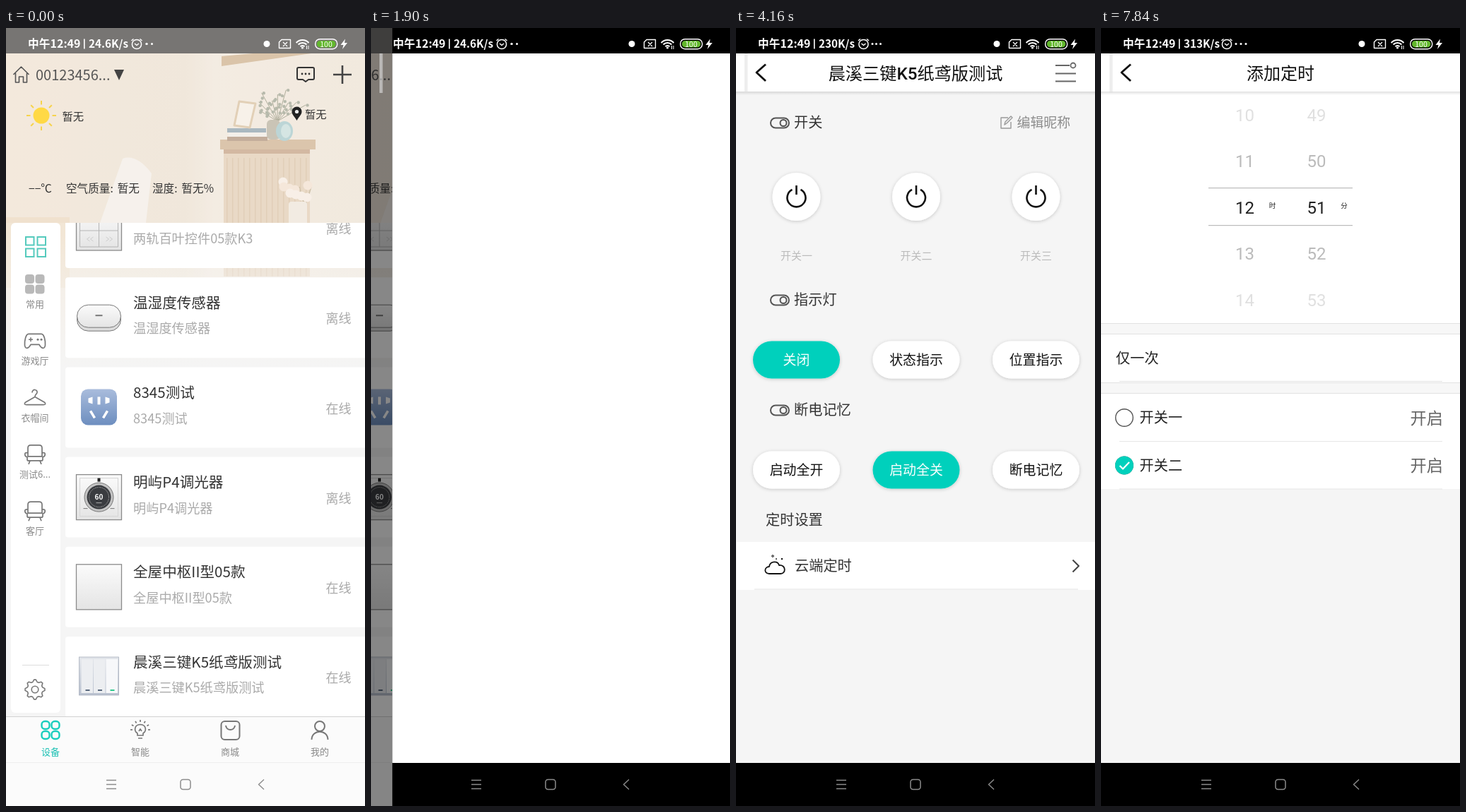
Recreate the animation shown at these times as an HTML page. Size 508 by 1102 pixels, loop 8000 ms.

```html
<!DOCTYPE html>
<html lang="zh">
<head>
<meta charset="utf-8">
<style>
html, body { margin: 0; width: 100%; height: 100%; overflow: hidden; background: #000; }
svg { display: block; width: 100vw; height: 100vh; font-family: "Noto Sans CJK SC", "Noto Sans CJK", sans-serif; }
</style>
</head>
<body>
<svg id="stage" viewBox="0 0 508 1102"></svg>
<script>
const stage = document.getElementById('stage');
const TEAL = '#00d0bc';

// Drawing helpers; text is placed by its vertical centre.
const text = (x, y, size, fill, str, more = '') =>
  `<text x="${x}" y="${y + size * 0.37}" font-size="${size}" fill="${fill}" ${more}>${str}</text>`;
const mid = (x, y, size, fill, str, more = '') => text(x, y, size, fill, str, 'text-anchor="middle" ' + more);
const rect = (x, y, w, h, fill, more = '') =>
  `<rect x="${x}" y="${y}" width="${w}" height="${h}" fill="${fill}" ${more}/>`;
const disc = (x, y, r, fill, more = '') => `<circle cx="${x}" cy="${y}" r="${r}" fill="${fill}" ${more}/>`;
const line = (d, color, w = 2, fill = 'none') =>
  `<path d="${d}" fill="${fill}" stroke="${color}" stroke-width="${w}" stroke-linejoin="round"/>`;
const at = (x, y, body) => `<g transform="translate(${x} ${y})">${body}</g>`;
const group = (id, body) => `<g id="${id}">${body}</g>`;
const grad = (id, stops, dir = 'x1="0" y1="0" x2="0" y2="1"') =>
  `<linearGradient id="${id}" ${dir}>${stops.map(([o, c, a = 1]) =>
    `<stop offset="${o}" stop-color="${c}" stop-opacity="${a}"/>`).join('')}</linearGradient>`;
const repeat = (n, f) => Array.from({ length: n }, (_, i) => f(i)).join('');
const polar = (r, a) => `${(r * Math.cos(a)).toFixed(1)} ${(r * Math.sin(a)).toFixed(1)}`;
const rays = (n, r1, r2, color, w, from = 0, span = 2 * Math.PI) => repeat(n, i => {
  const a = from + i * span / n;
  return line(`M${polar(r1, a)}L${polar(r2, a)}`, color, w);
});
const four = (x, y, size, step, fill, more) =>
  repeat(4, i => rect(x + (i % 2) * step, y + (i >> 1) * step, size, size, fill, more));

const defs = `<defs>
  ${grad('wall', [[0, '#eedfcd'], [0.5, '#e9dccb'], [0.58, '#eee3d5'], [1, '#ebdfcf']], '')}
  ${grad('fade', [[0, '#f5f5f5', 0], [1, '#f5f5f5']])}
  ${grad('blue', [[0, '#a9bcdc'], [1, '#6d8ebf']])}
  ${grad('plate', [[0, '#fbfbfb'], [1, '#e4e4e4']])}
  ${grad('frame', [[0, '#e3e6ea'], [1, '#b9c1cf']])}
  ${grad('drop', [[0, '#000', 0.12], [1, '#000', 0]])}
  <clipPath id="list"><rect x="80" y="276" width="428" height="699"/></clipPath>
  <filter id="soft" x="-30%" y="-30%" width="160%" height="170%">
    <feDropShadow dx="0" dy="1" stdDeviation="2.5" flood-opacity=".2"/></filter>
</defs>`;

// ---- Home page ----
const photo = rect(0, 36, 508, 450, 'url(#wall)')
  + line('M305 40L350 36H432L305 54Z', 'none', 0, '#c9aa84')
  + line('M133 276L165 185Q185 178 206 206L198 276Z', 'none', 0, '#f1ebe3')
  + rect(0, 268, 90, 100, '#e9d3b8')
  + rect(308, 172, 122, 180, '#dfc8ad')
  + repeat(15, i => rect(312 + i * 8, 184, 1.5, 168, '#d4b999'))
  + rect(303, 158, 135, 14, '#cbab88') + rect(308, 172, 122, 6, '#c0997a')
  + rect(313, 154, 57, 6, '#a98a70') + rect(315, 148, 54, 6, '#eee8df') + rect(313, 142, 55, 6, '#8599a5')
  + line('M330 104L353 107L345 141L323 138Z', '#d5bb98', 3, '#f3ebdf')
  + at(384, 132, repeat(9, i => {
      const a = -2.6 + i * 0.26, r = 30 + (i % 3) * 8;
      return line(`M0 0L${polar(r, a)}`, '#8c8a70', 1)
        + repeat(4, k => `<g transform="translate(${polar(r * (0.45 + k * 0.18), a)})">${disc(k % 2 ? 3 : -3, 0, 2.2, '#989c88')}</g>`);
    }))
  + rect(369, 130, 19, 28, '#b3aa96', 'rx="6"')
  + '<ellipse cx="394" cy="146" rx="12" ry="14" fill="#9fc3c4"/><ellipse cx="396" cy="146" rx="7" ry="10" fill="#c3d9d7"/>'
  + line('M422 250L415 225M424 250L432 225', '#b8a583', 1.5)
  + repeat(9, i => disc(392 + (i * 17) % 42, 218 + (i * 11) % 24, 6.5, i % 2 ? '#f0dcca' : '#f4e8dc'))
  + rect(400, 246, 26, 36, '#ece2d5', 'rx="4"')
  + rect(0, 36, 508, 450, '#fff', 'opacity=".3"')
  + rect(0, 276, 508, 210, '#fff', 'opacity=".15"')
  + rect(0, 290, 508, 196, 'url(#fade)');

const pad = 'M-9 -10C-13 -10 -15 0 -14.5 6C-14 12 -9 11 -6 5H6C9 11 14 12 14.5 6C15 0 13 -10 9 -10Z';
const rooms = [
  ['常用', four(-14, -14, 13, 14.5, '#b9b9b9', 'rx="4"')],
  ['游戏厅', line(pad, '#777', 1.7) + line('M-9 -2H-3M-6 -5V1', '#777', 1.5)
    + disc(4, -2, 1.5, '#777') + disc(9, -2, 1.5, '#777')],
  ['衣帽间', line('M-4 -7C-4 -13 4 -12 3 -7C2 -4 0 -5 0 -1L14 7Q16 10 12 10H-12Q-16 10 -14 7L0 -1', '#777', 1.7)],
  ['测试6...', 'chair'], ['客厅', 'chair']
];
const chair = line('M-10 -2V-9Q-10 -13 -6 -13H6Q10 -13 10 -9V-2M-10 -2C-16 -4 -15 3 -11 4V7Q-11 9 -9 9H9Q11 9 11 7V4C15 3 16 -4 10 -2V3H-10ZM-7 9L-9 14M7 9L9 14', '#777', 1.7);
const gear = line('M' + Array.from({ length: 32 }, (_, i) =>
  polar(i % 4 < 2 ? 14 : 11, (i - 0.5) * Math.PI / 16)).join('L') + 'Z', '#777', 1.6) + disc(0, 0, 4.8, 'none', 'stroke="#777" stroke-width="1.6"');

const sidebar = rect(7, 276, 70, 694, '#fff', 'rx="6"')
  + four(28, 296, 11.5, 16.5, 'none', 'stroke="#55cabd" stroke-width="2"')
  + rooms.map(([name, icon], i) =>
      at(41, 363 + i * 80.3, icon === 'chair' ? chair : icon) + mid(41, 391 + i * 80.4, 13, '#8a8a8a', name)).join('')
  + rect(23, 902, 38, 1, '#ddd') + at(41, 937, gear);

// Device pictures are drawn around their centre.
const plate = rect(-32, -32, 64, 64, 'url(#plate)', 'stroke="#8b8b8b" stroke-width="1.3"');
const devices = [
  ['两轨百叶控件05款K3', '离线', plate + line('M0 -27V27M-27 4H27M-27 -27H27V27H-27Z', '#b5b5b5', 1)
    + line('M-13 13L-17 16L-13 19M-8 13L-12 16L-8 19M10 13L14 16L10 19M15 13L19 16L15 19', '#ccc', 1)],
  ['温湿度传感器', '离线', rect(-31, -14, 62, 33, '#dcdcdc', 'rx="16" stroke="#777" stroke-width="1"')
    + rect(-31, -18, 62, 32, 'url(#plate)', 'rx="16" stroke="#777" stroke-width="1"')
    + line('M-5 -3H5', '#777', 2)],
  ['8345测试', '在线', rect(-25.5, -26, 51, 51, 'url(#blue)', 'rx="10"')
    + rect(-2, -15, 4, 11, '#fff') + line('M-15 -13L-9 -15V-5L-15 -7ZM15 -13L9 -15V-5L15 -7Z', 'none', 0, '#fff')
    + line('M-12 5L-6 15M12 5L6 15', '#fff', 3.5)],
  ['明屿P4调光器', '离线', plate + rect(-27, -27, 54, 54, 'none', 'stroke="#d5d5d5"') + rect(-2, -27, 4, 5, '#222')
    + disc(0, 0, 20.5, '#c4c4c4', 'stroke="#777" stroke-width="1"') + disc(0, 0, 17, '#3a3c40')
    + disc(0, 0, 14, 'none', 'stroke="#aaa" stroke-dasharray="1.5 1"')
    + mid(0, 0, 10, '#fff', '60', 'font-weight="700"') + line('M-4 8H4', '#aaa', 1)
    + line('M-22 16H-16M16 16H22', '#777', 1)],
  ['全屋中枢II型05款', '在线', plate],
  ['晨溪三键K5纸鸢版测试', '在线', rect(-28, -28, 56, 54, 'url(#frame)', 'stroke="#a9b0bd" stroke-width=".8"')
    + repeat(3, i => rect(-25 + i * 17.5, -25, 16.5, 48, i < 2 ? '#eceef1' : '#f7f8fa')
      + rect(-19 + i * 17.5, 18, 6, 2, i < 2 ? '#57677c' : '#2fc98e'))]
];
const cards = devices.map(([name, state, icon], i) => at(84, 226 + i * 127.2,
  rect(0, 0, 430, 114, '#fff', 'rx="4"') + at(47.5, 57, icon)
  + text(96, 36, 20.6, '#333', name) + text(96, 72.5, 18.2, '#aaa', name)
  + text(368.5, 58.5, 18, '#aaa', state))).join('');

const tabs = rect(0, 975, 508, 127, '#fbfbfb') + rect(0, 975, 508, 1, '#d2d2d2') + rect(0, 1040, 508, 1, '#eee')
  + four(50.5, 982, 11, 14, 'none', 'rx="4.5" stroke="#18cdbd" stroke-width="2.4"')
  + at(190, 994, line('M-4 8V5C-9 2 -9 -7 0 -7.5C9 -7 9 2 4 5V8ZM-3 12H3M-2 2L0 -1L2 2', '#777', 1.7)
    + rays(7, 11, 14, '#777', 1.7, -Math.PI, Math.PI * 7 / 6))
  + rect(304.5, 982, 26, 26, 'none', 'rx="5" stroke="#777" stroke-width="2"') + line('M311 988C312 996 323 996 324 988', '#777')
  + disc(444, 989, 7, 'none', 'stroke="#777" stroke-width="2"') + line('M432.5 1008C433 993 455 993 455.5 1008', '#777')
  + ['设备', '智能', '商城', '我的'].map((s, i) =>
      mid(63 + i * 127, 1025.5, 13, i ? '#888' : '#18bfb2', s)).join('');

const home = rect(0, 0, 508, 1102, '#f5f5f5') + photo
  + rect(0, 0, 508, 36, '#777573')
  + line('M10.5 66L21.5 55L32.5 66M13.5 64V77H18.5V69H24.5V77H29.5V64', '#555', 1.6)
  + text(42, 67, 20, '#555', '00123456...')
  + line('M153 59H167L160 74Z', 'none', 0, '#444')
  + line('M414 56H434Q436 56 436 58V71Q436 73 434 73H428L424 76L420 73H414Q412 73 412 71V58Q412 56 414 56Z', '#333')
  + repeat(3, i => disc(419 + i * 5, 65, 1.4, '#333'))
  + line('M463 66H489M476 53V79', '#444', 2.6)
  + at(50, 124, disc(0, 0, 11.5, '#ffd945') + rays(8, 15.5, 21, '#f6d34c', 2))
  + text(79.5, 125, 15.3, '#333', '暂无')
  + line('M411.5 131C407 124 404.5 122 404.5 118.5A7 7 0 0 1 418.5 118.5C418.5 122 416 124 411.5 131Z', 'none', 0, '#222')
  + disc(411.5, 118.5, 2.6, '#eee') + text(423, 122.5, 15.3, '#333', '暂无')
  + text(32, 227, 15.6, '#333', '−−℃') + text(85, 227, 15.6, '#333', '空气质量: 暂无', 'word-spacing="2.5"')
  + text(207, 227, 15.6, '#333', '湿度: 暂无%', 'word-spacing="2.5"')
  + sidebar + `<g clip-path="url(#list)">${cards}</g>` + tabs
  + rect(-10, 0, 800, 1102, '#000', 'id="dim"');

// ---- Pages behind the home page ----
const shade = rect(0, 90, 508, 5, 'url(#drop)');
const back = line('M42 51.5L29 63L42 75', '#111', 2.8);
const title = s => mid(254, 64, 24, '#111', s);
const sheet = rect(0, 36, 508, 1005, '#f5f5f5') + rect(0, 36, 508, 54, '#fff') + shade;

const heading = (y, s) => rect(49, y - 6.5, 26, 14, 'none', 'rx="7" stroke="#555" stroke-width="2"')
  + disc(67, y + 0.5, 4.5, 'none', 'stroke="#555" stroke-width="2"') + text(82, y, 20.2, '#333', s);
const columns = [85.5, 255, 424.5];
const pills = (y, names, on) => columns.map((x, i) =>
  rect(x - 61.5, y - 0.5, 123, 53, i === on ? TEAL : '#fff', 'rx="26.5" filter="url(#soft)"')
  + mid(x, y + 26, 18.9, i === on ? '#fff' : '#111', names[i])).join('');

const device = back
  + mid(254, 64, 24.2, '#111', '晨溪三键<tspan font-family="Roboto, sans-serif" font-weight="500">K5</tspan>纸鸢版测试')
  + heading(134, '开关')
  + line('M385 127H375V142H389V133M380 137L381 133L389 125L391 127L383 135Z', '#999', 1.4)
  + text(397.5, 134, 18.9, '#8c8c8c', '编辑昵称')
  + columns.map((x, i) => disc(x, 239, 34, '#fff', 'filter="url(#soft)"')
    + line(`M${x - 6} 228.8A13 13 0 1 0 ${x + 6} 228.8M${x} 223V236`, '#111', 2.6)
    + mid(x, 322, 15, '#bbb', '开关' + '一二三'[i])).join('')
  + heading(385, '指示灯') + pills(444, ['关闭', '状态指示', '位置指示'], 0)
  + heading(541, '断电记忆') + pills(600, ['启动全开', '启动全关', '断电记忆'], 1)
  + text(42, 697, 20.2, '#333', '定时设置')
  + rect(1, 728, 507, 68, '#fff') + rect(26, 794.5, 458, 1, '#e2e2e2')
  + line('M47 773C39 773 40 763 47 763C48 755 59 754 61 761C71 760 71 773 63 773Z', '#111', 1.8)
  + disc(52, 748, 1.3, 'none', 'stroke="#111"') + disc(57, 752, 0.9, '#111') + disc(65, 752, 1.2, '#111')
  + text(83, 762, 20.2, '#333', '云端定时') + line('M476.5 753.5L485 762L476.5 770.5', '#444', 2);

const timers = sheet + back + title('定时') + line('M452 63H481M466.5 48.5V77.5', '#666', 2.6);

const wheel = (x, first) => repeat(5, i =>
  mid(x, 123 + i * 65.5, 24, ['#222', '#bbb', '#e0e0e0'][Math.abs(i - 2)], first + i, 'font-family="Roboto, sans-serif"'));
const choice = (y, s) => disc(33, y, 12.3, '#fff', 'stroke="#555" stroke-width="1.4"')
  + text(54.5, y, 20.2, '#222', s) + text(437.5, y, 23.2, '#666', '开启') + rect(26, y + 33, 457, 1, '#e6e6e6');
const adding = sheet + rect(0, 90, 508, 563, '#fff') + shade + back + title('添加定时')
  + wheel(203.5, 10) + wheel(305, 49)
  + rect(152, 226, 204, 1.2, '#bbb') + rect(152, 279, 204, 1.2, '#bbb')
  + mid(242.5, 251, 9.5, '#222', '时') + mid(344, 251, 9.5, '#222', '分')
  + [[418, 16], [502, 16]].map(([y, h]) => rect(0, y, 508, h, '#e2e2e2') + rect(0, y + 1, 508, h - 2, '#f7f7f7')).join('')
  + text(21, 468, 20.2, '#222', '仅一次') + rect(26, 500, 457, 1, '#e2e2e2')
  + choice(552, '开关一') + choice(619.5, '开关二')
  + group('check', disc(33, 619.5, 13, TEAL) + line('M26.5 620L31 624.5L40 615', '#fff', 2.2));

const panel = rect(0, 0, 508, 1102, '#000') + rect(0, 36, 508, 1005, '#fff')
  + group('sheet', sheet)
  + group('menu', line('M452 53H472M452 64.5H481M452 75.5H481', '#666', 2.2)
    + disc(477, 53, 3.5, 'none', 'stroke="#666" stroke-width="1.8"'))
  + group('device', device) + group('timers', timers)
  + group('empty', mid(254, 450.5, 24, '#999', '暂无定时，请点击添加'))
  + group('adding', adding);

// ---- System bars, always on top ----
const bold = 'font-weight="700"';
const bars = rect(12, 36, 4.5, 56, '#e1e1e1', 'id="handle" opacity=".6"')
  + text(31, 22.5, 15.7, '#fff', '中午', bold) + text(62.5, 22.5, 16, '#fff', '12:49', bold)
  + rect(110, 15.5, 1.6, 14, '#fff') + text(117, 22.5, 15.3, '#fff', '', bold + ' id="speed"')
  + group('alarm', disc(0, 23, 6.6, 'none', 'stroke="#fff" stroke-width="1.5"')
    + line('M-3 22L0 24.5L3 22M-7.5 18L-4.5 15.5M7.5 18L4.5 15.5', '#fff', 1.5))
  + repeat(3, i => disc(0, 22.5, 1.5, '#fff', `id="dot${i}"`))
  + disc(369, 22.5, 4.5, '#fff')
  + line('M390 16.5H402.5V28.5H386.5V20ZM392 20L398 26M398 20L392 26', '#fff', 1.4)
  + at(419.5, 29, [4, 8, 12].map(r => line(`M${polar(r, -2.4)}A${r} ${r} 0 0 1 ${polar(r, -0.74)}`, '#fff', 2.2)).join('')
    + disc(0, -1, 1.6, '#fff') + line('M6 -4V1M8.5 -4V1', '#fff', 1))
  + rect(437.7, 15.7, 31, 14, 'none', 'rx="6.5" stroke="#fff" stroke-width="1.4"')
  + rect(440, 18, 26.4, 9.4, '#62b82c', 'rx="4.5"') + mid(453, 22.7, 10.5, '#fff', '100', 'font-weight="500"')
  + line('M480 15.5L473.5 24H477.5L476 30L483 21H479Z', 'none', 0, '#fff')
  + line('M142 1065.5H156M142 1071.5H156M142 1077.5H156M365 1064.5L357.5 1071.5L365 1078.5', '#8c8c8c', 1.4)
  + rect(247, 1064.5, 14, 14, 'none', 'rx="3.5" stroke="#8c8c8c" stroke-width="1.5"');

stage.innerHTML = defs + group('home', home) + group('panel', panel) + bars;

// ---- Motion ----
const el = id => document.getElementById(id);
const ramp = (t, a, b) => Math.min(1, Math.max(0, (t - a) / (b - a)));
const easeOut = u => 1 - (1 - u) ** 3;
const slide = (id, x) => el(id).setAttribute('transform', `translate(${x.toFixed(1)} 0)`);
const fade = (id, v) => {
  el(id).setAttribute('opacity', v);
  el(id).setAttribute('display', v > 0 ? 'inline' : 'none');
};
// Critically damped spring for the page change.
const spring = ms => {
  if (ms <= 0) return 0;
  const k = ms * 0.0161, p = 1 - (1 + k) * Math.exp(-k);
  return p > 0.998 ? 1 : p;
};
const speeds = [
  { from: 6600, label: '313K/s', alarm: 178, dots: [191, 198, 205] },
  { from: 2390, label: '230K/s', alarm: 180.5, dots: [193, 198.5, 204.5] },
  { from: 0, label: '24.6K/s', alarm: 185, dots: [199, 199, 206.5] }
];

function draw(now) {
  const t = now % 8000;
  const open = spring(t - 1619.3);
  slide('home', -127 * open);
  slide('panel', 508 * (1 - open));
  fade('dim', open / 2);
  fade('handle', t >= 1700 ? 0.6 : 0);

  fade('sheet', +(t >= 2060));
  fade('menu', +(t >= 3840));
  fade('device', ramp(t, 3900, 4060));
  fade('timers', ramp(t, 5320, 5570));
  fade('empty', +(t >= 5770));
  slide('empty', 374 * (1 - easeOut(ramp(t, 5730, 6060))));
  fade('adding', +(t >= 7010));
  slide('adding', 508 * (1 - easeOut(ramp(t, 6970, 7380))));
  fade('check', +(t >= 7840));

  const net = speeds.find(s => t >= s.from);
  el('speed').textContent = net.label;
  slide('alarm', net.alarm);
  net.dots.forEach((x, i) => el('dot' + i).setAttribute('cx', x));
  requestAnimationFrame(draw);
}
draw(0);
</script>
</body>
</html>
```
